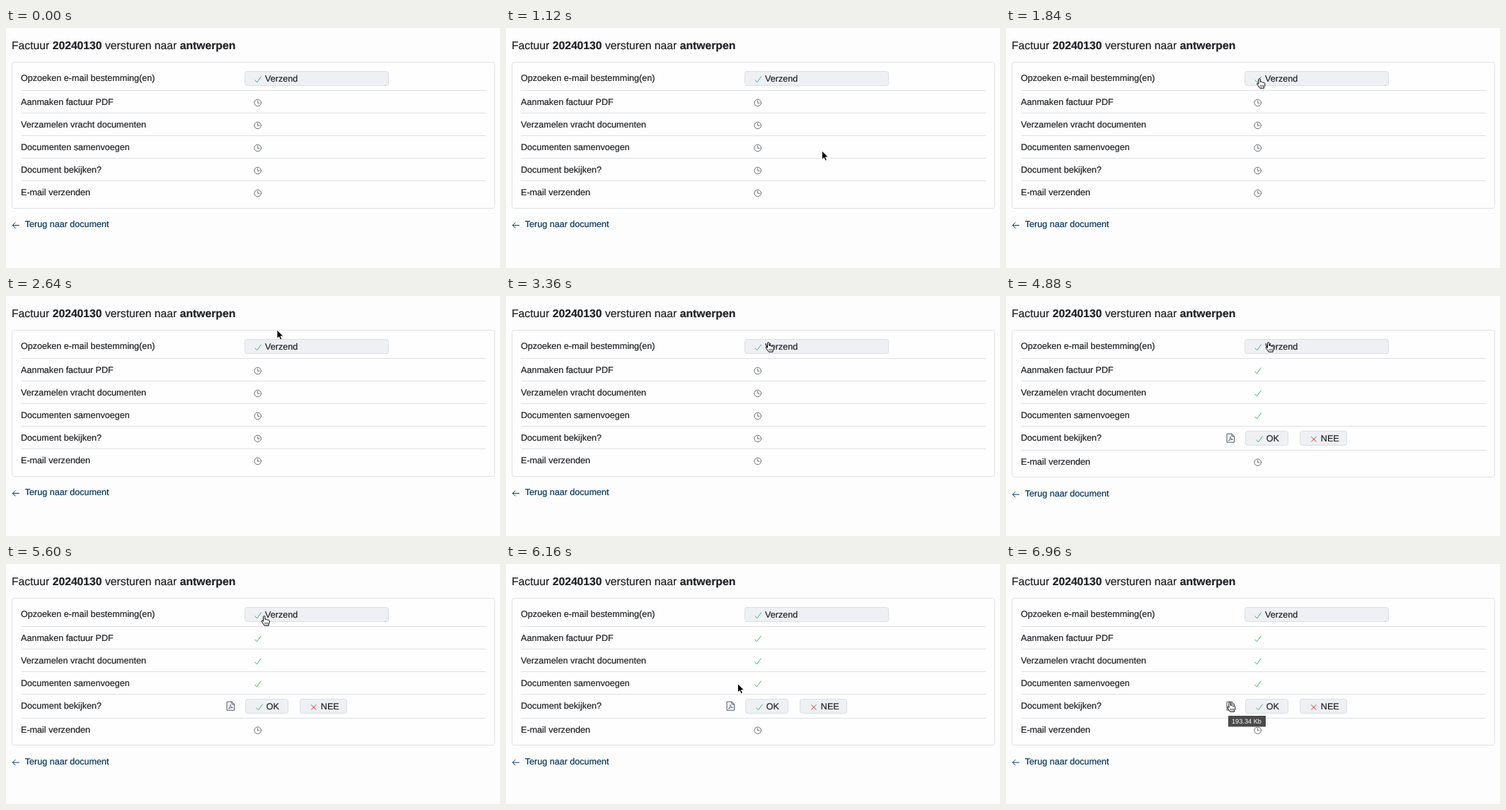
An HTML page for the animation above (8000 ms loop, 698 px wide and 340 px high).

```html
<!DOCTYPE html>
<html lang="nl">
<head>
<meta charset="utf-8">
<title>Factuur versturen</title>
<style>
  html, body { margin: 0; width: 100%; height: 100%; overflow: hidden; background: #fdfdfd; }
  svg { display: block; width: 698px; height: 340px; }
  text { font: 12.58px "Liberation Sans", Arial, sans-serif; fill: #212326; stroke: #212326; stroke-width: .22; text-rendering: geometricPrecision; white-space: pre; }
  .title { font-size: 15.72px; }
  .title tspan { font-weight: bold; }
  .mail { font-size: 10.8px; fill: #9297a0; stroke: #9297a0; }
  .link { fill: #0b3a5c; stroke: #0b3a5c; }
  .tip { font-size: 9.2px; fill: #fff; stroke: none; }
  .box { fill: #eef0f3; stroke: #dadfe4; }
  .card { fill: #fefefe; stroke: #e0e2e4; }
  .rule { stroke: #dfe1e3; }
  .icon { fill: none; stroke-linecap: round; stroke-linejoin: round; }
</style>
</head>
<body>
<svg viewBox="0 0 698 340">
  <defs>
    <path id="check" class="icon" stroke="#42b673" d="M-4 1L-1.3 4L4.5-4"/>
    <path id="cross" class="icon" stroke="#dc3b45" d="M-3.3-3.3L3.3 3.3M3.3-3.3L-3.3 3.3"/>
    <g id="clock" class="icon" stroke="#5b5f64" stroke-width=".9"><circle r="4.8"/><path d="M0-3V.3H2.4"/></g>
    <g id="pdf" class="icon" stroke="#4d5663">
      <path d="M.5.5H7L10.5 4V12.5H.5ZM7 .5V4H10.5"/>
      <path d="M2.5 10.2Q5.5 8 5 4.7Q5 8 8.5 8.7Q5 8.4 2.5 10.2Z" stroke-width=".8"/>
    </g>
    <path id="arrow" d="M0 0V12.2L2.8 9.7L4.7 14L6.8 13.1L4.9 8.9H8.8Z" fill="#000" stroke="#fff" stroke-width=".8"/>
    <g id="hand" transform="translate(-.7 -.6)" stroke="#000" stroke-linejoin="round">
      <path fill="#fff" d="M-1.3 8V1.4a1.2 1.2 0 0 1 2.4 0V5q1.1-.8 2.2.2t2.2.6t2 1.4v2.6l-1.2 2.6v1.4h-6l-4-6q0-2 2.4.2z"/>
      <path stroke-width=".8" d="M1.2 9.4v2.6m2 0v-2.6m2 0v2.6"/>
    </g>
  </defs>

  <text class="title" x="8" y="30">Factuur <tspan>20240130</tspan> versturen naar <tspan>antwerpen</tspan></text>
  <rect id="card" class="card" x="8.5" y="48.5" width="682" height="207" rx="3"/>
  <g id="rows"></g>

  <g id="send">
    <text class="mail" x="417.8" y="76">accounts@sample.test</text>
  </g>
  <g id="choice">
    <use class="hit" href="#pdf" x="312" y="194.7"/>
  </g>
  <g id="back">
    <path class="icon" stroke="#0b3a5c" d="M18.5 279.5H9.5M13 275.8L9.3 279.5L13 283.2"/>
    <text class="link" x="26.7" y="282.3">Terug naar document</text>
  </g>
  <g id="tip">
    <rect x="314" y="215" width="53" height="15.5" fill="#4a4a4a"/>
    <text class="tip" x="319" y="226.2">193.34 Kb</text>
  </g>
  <use id="cursor"/>
</svg>
<script>
const LOOP = 8000, STEP = 80;
const DONE = 4000, TIP = 6800;
const labels = ["Opzoeken e-mail bestemming(en)", "Aanmaken factuur PDF", "Verzamelen vracht documenten",
  "Documenten samenvoegen", "Document bekijken?", "E-mail verzenden"];

// The pointer enters at `entry`, then glides to each stop between two times
const entry = { x: 664, y: 278 };
const moves = [
  { from: 640, to: 880, x: 446.5, y: 174 },
  { from: 1440, to: 1840, x: 359, y: 72 },
  { from: 1840, to: 2160, x: 356, y: 42.5 },
  { from: 2240, to: 2640, x: 383, y: 48 },
  { from: 2640, to: 2880, x: 509, y: 66 },
  { from: 2960, to: 3360, x: 371.5, y: 66 },
  { from: 5520, to: 5600, x: 365.5, y: 74 },
  { from: 5600, to: 6400, x: 317, y: 196 }
];

const $ = id => document.getElementById(id);
const clamp = k => Math.max(0, Math.min(1, k));
const ease = k => k * k * (3 - 2 * k);
const show = (el, on) => el.setAttribute("visibility", on ? "visible" : "hidden");
const shift = (el, y) => el.setAttribute("transform", `translate(0 ${y})`);

function set(el, attrs) {
  for (const key in attrs) el.setAttribute(key, attrs[key]);
  return el;
}

function add(parent, tag, attrs, text = "") {
  const el = set(document.createElementNS("http://www.w3.org/2000/svg", tag), attrs);
  el.textContent = text;
  return parent.appendChild(el);
}

function addButton(parent, x, y, width, icon, label) {
  const pad = (width > 100 ? 18.5 : 19.3);
  add(parent, "rect", { class: "box hit", x, y, width, height: 20, rx: 3 });
  add(parent, "use", { href: icon, x: x + pad, y: y + 11.4 });
  add(parent, "text", { x: x + pad + 10, y: y + 14.7 }, label);
}

const rows = labels.map((label, i) => {
  const y = 73 + 32 * i, box = $("rows");
  const text = add(box, "text", { x: 21, y: i ? y + 4 : 75.3 }, label);
  if (!i) return { text };
  const rule = add(box, "path", { class: "rule", d: `M21 ${y - 16.5}H678` });
  const icon = add(box, "use", { href: "#clock", x: 355.7, y: y + 1 });
  return { text, rule, icon };
});
addButton($("send"), 337.5, 61.5, 203, "#check", "Verzend");
addButton($("choice"), 338.5, 191.5, 60, "#check", "OK");
addButton($("choice"), 415.5, 191.5, 66, "#cross", "NEE");

const hits = [...document.querySelectorAll(".hit")].map(el => ({
  area: el.getBoundingClientRect(),
  late: $("choice").contains(el)
}));

function pointer(t) {
  let { x, y } = entry;
  for (const move of moves) {
    const k = ease(clamp((t - move.from) / (move.to - move.from)));
    x += (move.x - x) * k;
    y += (move.y - y) * k;
  }
  return { x, y };
}

function drawCursor(t, done) {
  const { x, y } = pointer(t);
  const over = hits.some(({ area, late }) => (done || !late) &&
    x >= area.left && x <= area.right && y >= area.top && y <= area.bottom);
  set($("cursor"), { href: over ? "#hand" : "#arrow", x, y });
  show($("cursor"), t >= moves[0].from);
}

function draw(time) {
  const t = Math.floor((time % LOOP) / STEP) * STEP;
  const done = t >= DONE;

  for (const { icon } of rows.slice(1, 4)) set(icon, { href: done ? "#check" : "#clock" });
  show(rows[4].icon, !done);
  show($("choice"), done);

  const { text, rule, icon } = rows[5];
  shift(rule, done ? 2 : 0);
  for (const el of [text, icon, $("back")]) shift(el, done ? 1.7 : 0);
  set($("card"), { height: done ? 208 : 207 });

  set($("tip"), { opacity: clamp((t - TIP + STEP) / (3 * STEP)) });
  drawCursor(t, done);
}

let start;
function tick(now) {
  start ??= now;
  draw(now - start);
  requestAnimationFrame(tick);
}
draw(0);
requestAnimationFrame(tick);
</script>
</body>
</html>
```
